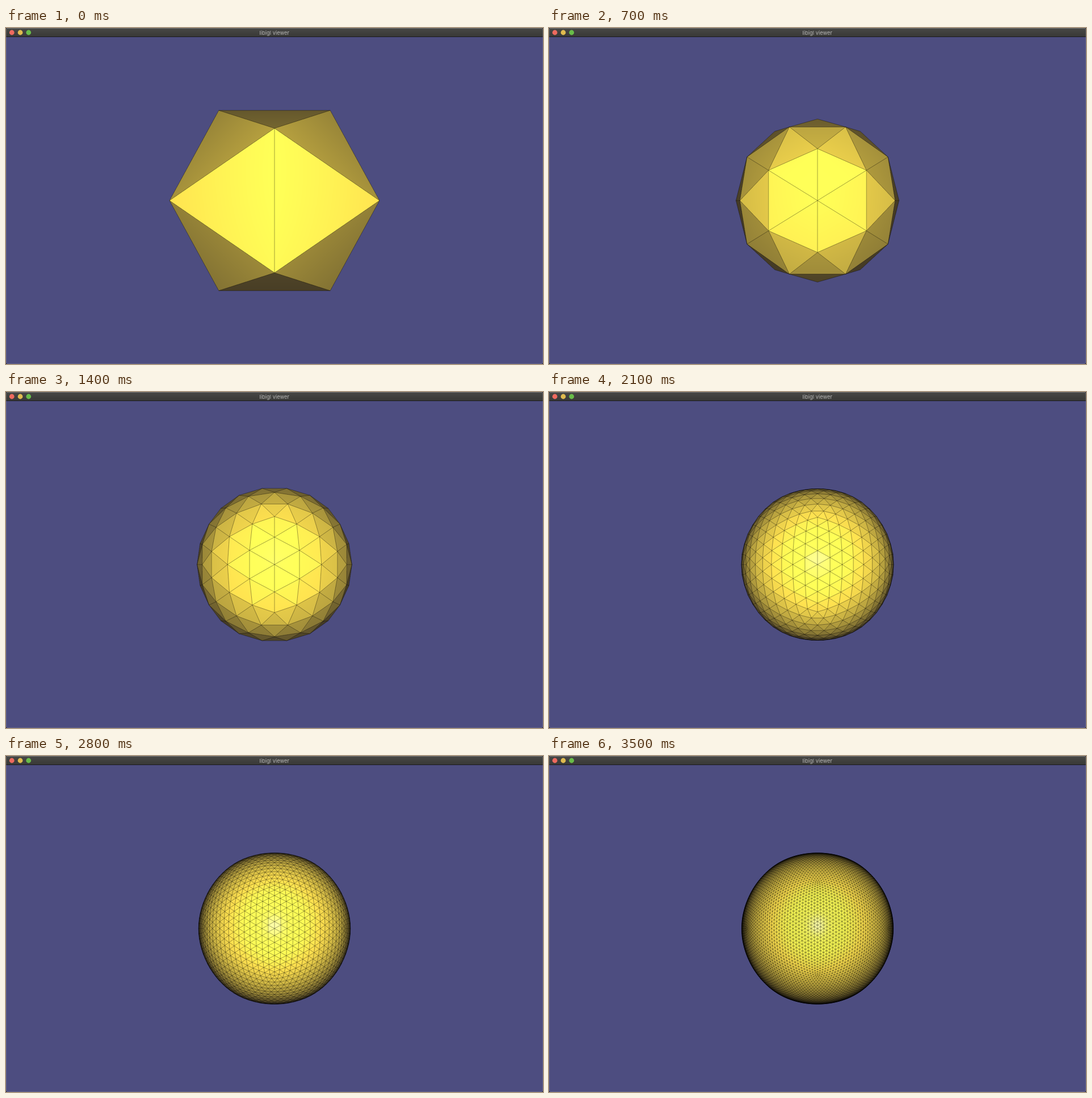
Recreate the animation shown at these times as an HTML page with a canvas. Size 946 by 592 pixels, loop 4.2 s.

```html
<!DOCTYPE html>
<html lang="en">
<head>
<meta charset="utf-8">
<title>libigl viewer</title>
<style>
  html, body { margin: 0; width: 100%; height: 100%; overflow: hidden; background: #17171c; }
  #window { position: relative; width: 946px; height: 592px; overflow: hidden;
    border-radius: 3px; background: #4d4d80; }
  #window::after { content: ""; position: absolute; inset: 0; border-radius: 3px;
    box-shadow: inset 0 0 0 1px rgba(150, 150, 160, .28); }
  canvas, svg { position: absolute; left: 0; top: 0; display: block; }
</style>
</head>
<body>
<div id="window">
  <canvas id="view" width="946" height="592"></canvas>
  <svg width="946" height="16" viewBox="0 0 946 16">
    <defs>
      <linearGradient id="bar" x2="0" y2="1">
        <stop offset="0" stop-color="#484846"/>
        <stop offset="1" stop-color="#383836"/>
      </linearGradient>
    </defs>
    <rect width="946" height="16" fill="url(#bar)"/>
    <rect width="946" height="1" fill="#666664"/>
    <rect y="15" width="946" height="1" fill="#1c1c1e"/>
    <circle cx="10.3" cy="8" r="4.4" fill="#ee6a5f"/>
    <circle cx="25.1" cy="8" r="4.4" fill="#e0bb4f"/>
    <circle cx="39.8" cy="8" r="4.4" fill="#68bd49"/>
    <text x="472.7" y="11.6" text-anchor="middle" font-family="Inter, sans-serif"
      font-size="9.4" fill="#b8b8b6">libigl viewer</text>
  </svg>
</div>
<script>
const STEP = 700, LEVELS = 6;
const CX = 473, CY = 304, FOCAL = 695, DIST = 7.08;
const BOX = { x: 280, y: 136, w: 386, h: 336 }, SS = 2;
const EYE = [0, 0, DIST], LIGHT = [0, 0.425, DIST];
const AMBIENT = [51, 43, 33], DIFFUSE = [255, 228, 58], SPECULAR = [255, 235, 80];
const SHINE = 35, WIRE = 0.37;

const add = (a, b) => [a[0] + b[0], a[1] + b[1], a[2] + b[2]];
const sub = (a, b) => [a[0] - b[0], a[1] - b[1], a[2] - b[2]];
const mul = (a, k) => [a[0] * k, a[1] * k, a[2] * k];
const dot = (a, b) => a[0] * b[0] + a[1] * b[1] + a[2] * b[2];
const unit = a => mul(a, 1 / Math.sqrt(dot(a, a)));
const cross = (a, b) => [
  a[1] * b[2] - a[2] * b[1], a[2] * b[0] - a[0] * b[2], a[0] * b[1] - a[1] * b[0]];
const normal = (a, b, c) => unit(cross(sub(b, a), sub(c, a)));

function icosahedron() {
  const phi = (1 + Math.sqrt(5)) / 2, verts = [], faces = [];
  for (const s of [-1, 1]) for (const t of [-phi, phi])
    verts.push([0, s, t], [s, t, 0], [t, 0, s]);
  const near = (i, j) => {
    const d = sub(verts[i], verts[j]);
    return dot(d, d) < 4.1;
  };
  for (let i = 0; i < 12; i++) for (let j = i + 1; j < 12; j++) for (let k = j + 1; k < 12; k++) {
    if (!near(i, j) || !near(j, k) || !near(i, k)) continue;
    const n = normal(verts[i], verts[j], verts[k]);
    faces.push(dot(n, verts[i]) > 0 ? [i, j, k] : [i, k, j]);
  }
  return { verts, faces };
}

const edgeKey = (a, b) => Math.min(a, b) * 65536 + Math.max(a, b);

// Loop subdivision of a closed mesh
function subdivide({ verts, faces }) {
  const edges = new Map(), rings = verts.map(() => new Set());
  for (const f of faces) for (let k = 0; k < 3; k++) {
    const a = f[k], b = f[(k + 1) % 3], c = f[(k + 2) % 3], key = edgeKey(a, b);
    rings[a].add(b);
    if (!edges.has(key)) edges.set(key, { a, b, far: [0, 0, 0] });
    const e = edges.get(key);
    e.far = add(e.far, verts[c]);
  }
  const out = verts.map((v, i) => {
    const n = rings[i].size;
    const w = 5 / 8 - (3 / 8 + Math.cos(2 * Math.PI / n) / 4) ** 2;
    const sum = [...rings[i]].reduce((s, j) => add(s, verts[j]), [0, 0, 0]);
    return add(mul(v, 1 - w), mul(sum, w / n));
  });
  for (const e of edges.values()) {
    e.id = out.length;
    out.push(add(mul(add(verts[e.a], verts[e.b]), 3 / 8), mul(e.far, 1 / 8)));
  }
  const split = [];
  for (const [a, b, c] of faces) {
    const [p, q, r] = [[a, b], [b, c], [c, a]].map(([i, j]) => edges.get(edgeKey(i, j)).id);
    split.push([a, p, r], [p, b, q], [r, q, c], [p, q, r]);
  }
  return { verts: out, faces: split };
}

function project(p) {
  const s = FOCAL / (DIST - p[2]);
  return [CX + p[0] * s, CY - p[1] * s];
}

// Phong lighting with one normal per face
function shade(p, n, data, o) {
  const toLight = unit(sub(LIGHT, p)), toEye = unit(sub(EYE, p));
  const lit = Math.max(dot(n, toLight), 0);
  const mirror = sub(mul(n, 2 * lit), toLight);
  const gloss = Math.max(dot(mirror, toEye), 0) ** SHINE;
  for (let i = 0; i < 3; i++)
    data[o + i] = AMBIENT[i] + DIFFUSE[i] * lit + SPECULAR[i] * gloss;
  data[o + 3] = 255;
}

function fillFace(img, pts, a, n) {
  const [A, B, C] = pts.map(([x, y]) => [(x - BOX.x) * SS, (y - BOX.y) * SS]);
  const side = (p, q, x, y) => (q[0] - p[0]) * (y - p[1]) - (q[1] - p[1]) * (x - p[0]);
  const xs = [A[0], B[0], C[0]], ys = [A[1], B[1], C[1]];
  const x0 = Math.floor(Math.min(...xs)), x1 = Math.ceil(Math.max(...xs));
  const y0 = Math.floor(Math.min(...ys)), y1 = Math.ceil(Math.max(...ys));
  const depth = dot(n, sub(a, EYE));
  for (let y = y0; y < y1; y++) for (let x = x0; x < x1; x++) {
    const u = x + 0.5, v = y + 0.5;
    if (side(A, B, u, v) > 0 || side(B, C, u, v) > 0 || side(C, A, u, v) > 0) continue;
    const ray = [BOX.x + u / SS - CX, CY - BOX.y - v / SS, -FOCAL];
    const hit = add(EYE, mul(ray, depth / dot(n, ray)));
    shade(hit, n, img.data, (y * img.width + x) * 4);
  }
}

function canvasOf(w, h) {
  const c = document.createElement("canvas");
  c.width = w;
  c.height = h;
  return c;
}

function render({ verts, faces }) {
  const big = canvasOf(BOX.w * SS, BOX.h * SS), bigCtx = big.getContext("2d");
  const img = bigCtx.createImageData(big.width, big.height);
  const flat = verts.map(project), wires = new Map();
  for (const f of faces) {
    const [a, b, c] = f.map(i => verts[i]), n = normal(a, b, c);
    if (dot(n, sub(EYE, a)) <= 0) continue;
    fillFace(img, f.map(i => flat[i]), a, n);
    f.forEach((i, k) => wires.set(edgeKey(i, f[(k + 1) % 3]), [i, f[(k + 1) % 3]]));
  }
  bigCtx.putImageData(img, 0, 0);

  const out = canvasOf(946, 592), ctx = out.getContext("2d");
  ctx.drawImage(big, BOX.x, BOX.y, BOX.w, BOX.h);
  ctx.lineWidth = WIRE;
  ctx.strokeStyle = "#000";
  for (const [i, j] of wires.values()) {
    ctx.beginPath();
    ctx.moveTo(...flat[i]);
    ctx.lineTo(...flat[j]);
    ctx.stroke();
  }
  return out;
}

const stages = [];
for (let mesh = icosahedron(); stages.length < LEVELS; mesh = subdivide(mesh))
  stages.push(render(mesh));

const view = document.getElementById("view").getContext("2d");
let start = null, shown = -1;

function draw(now) {
  if (start === null) start = now;
  const level = Math.floor((now - start) / STEP) % LEVELS;
  if (level !== shown) {
    view.clearRect(0, 0, 946, 592);
    view.drawImage(stages[level], 0, 0);
    shown = level;
  }
  requestAnimationFrame(draw);
}
requestAnimationFrame(draw);
</script>
</body>
</html>
```
